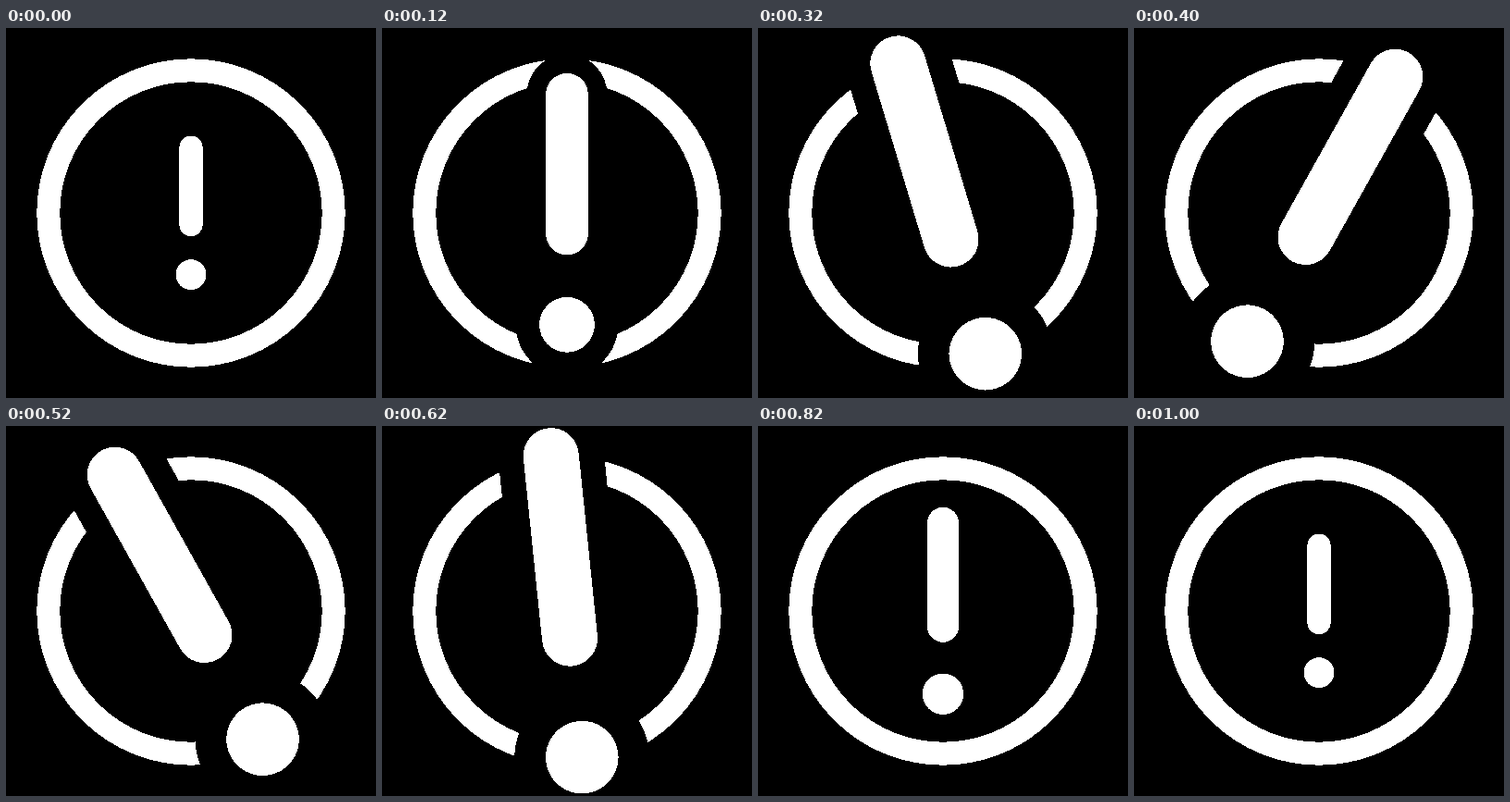
An HTML page for the animation above (1.02 s loop, 400 by 400 pixels).

```html
<!DOCTYPE html>
<html lang="en">
<head>
<meta charset="utf-8">
<title>Alert icon</title>
<style>
  html, body { margin: 0; height: 100%; overflow: hidden; background: #000; }
  svg { display: block; width: 100%; height: 100%; fill: none; stroke-linecap: round; }
</style>
</head>
<body>
<svg viewBox="-200 -200 400 400" shape-rendering="crispEdges">
  <circle r="154.2" stroke="#fff" stroke-width="25"/>
  <g id="mark">
    <!-- black halo that cuts the ring -->
    <path d="M0-70.8V12.5" stroke="#000" stroke-width="48"/>
    <circle cy="66.7" r="30.6" fill="#000"/>
    <path d="M0-70.8V12.5" stroke="#fff" stroke-width="25.2"/>
    <circle cy="66.7" r="16.5" fill="#fff"/>
  </g>
</svg>
<script>
const LOOP = 1020, STEP = 25;
const mark = document.getElementById('mark');

const inOut = x => (1 - Math.cos(Math.PI * x)) / 2;
const out = x => 1 - (1 - x) ** 2;

// keys: [time, value, easing towards this key]
const scaleKeys = [[0, 1], [225, 2.383, inOut], [650, 2.383, inOut], [1000, 1, out]];
const angleKeys = [[208, 0], [292, -29.2, inOut], [400, 29.2, inOut], [525, -29.2, inOut], [667, 0, inOut]];

function valueAt(keys, t) {
  const i = keys.findIndex(k => k[0] > t);
  if (i < 0) return keys[keys.length - 1][1];
  if (i === 0) return keys[0][1];
  const [t0, v0] = keys[i - 1], [t1, v1, ease] = keys[i];
  return v0 + (v1 - v0) * ease((t - t0) / (t1 - t0));
}

// 40 steps per second, each switching on a multiple of 10 ms
function stepTime(ms) {
  const tick = Math.floor(ms / 10) * 10;
  return Math.floor((tick + 5) / STEP) * STEP;
}

const start = performance.now();
function draw() {
  const t = stepTime((performance.now() - start) % LOOP);
  mark.setAttribute('transform', `rotate(${valueAt(angleKeys, t)}) scale(${valueAt(scaleKeys, t)})`);
  requestAnimationFrame(draw);
}
draw();
</script>
</body>
</html>
```
